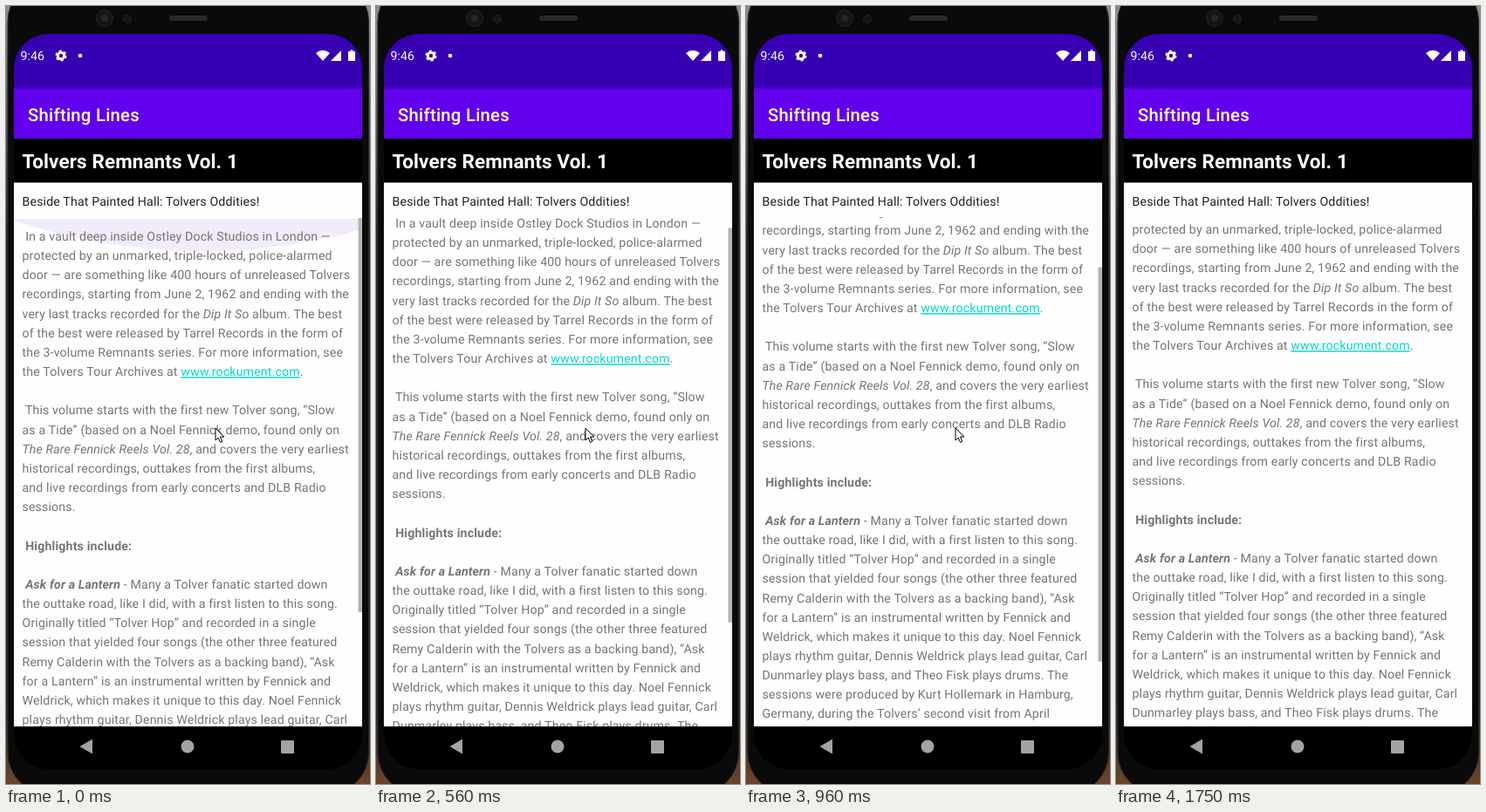
These frames come from a looping animation (417x892 px, 2150 ms). An HTML page:

```html
<!DOCTYPE html>
<html lang="en">
<head>
<meta charset="utf-8">
<title>Shifting Lines</title>
<style>
  html, body { margin: 0; width: 100%; height: 100%; overflow: hidden; background: #0a0a0b; }
  svg { display: block; }
  text { font-family: Roboto, sans-serif; white-space: pre; text-rendering: geometricPrecision; }
  .body { font-size: 14.2px; letter-spacing: .135px; }
  #article { fill: #757575; }
  .i { font-style: italic; }
  .b { font-weight: 700; }
  .link { fill: #03dac5; text-decoration: underline; }
</style>
</head>
<body>
<svg width="417" height="892" viewBox="0 0 417 892">
  <defs>
    <clipPath id="page"><rect x="9" y="242" width="399" height="584"/></clipPath>
    <clipPath id="row"><rect x="9" y="244" width="399" height="50"/></clipPath>
    <linearGradient id="desk" x2="0" y2="1">
      <stop stop-color="#8c8c8c"/>
      <stop offset=".3" stop-color="#2b2b2d"/>
      <stop offset=".9" stop-color="#2b2b2d"/>
      <stop offset="1" stop-color="#6b4428"/>
    </linearGradient>
  </defs>

  <!-- phone body -->
  <rect width="417" height="892" fill="url(#desk)"/>
  <rect x="2" y="-30" width="413.5" height="934" rx="48" fill="#0a0a0b" stroke="#29292b"/>
  <circle cx="113" cy="14" r="9.5" fill="#151517" stroke="#222225"/>
  <circle cx="113" cy="14" r="4" fill="#25262b"/>
  <circle cx="139" cy="15" r="4.5" fill="#151517" stroke="#222225"/>
  <rect x="187" y="11" width="44" height="6" rx="3" fill="#29292a"/>

  <!-- screen -->
  <path d="M9 95V72A40 40 0 0 1 49 32H368A40 40 0 0 1 408 72V95Z" fill="#3700b3"/>
  <path d="M9 94.5H408V152H9Z" fill="#6200ee"/>
  <path d="M9 152H408V835A40 40 0 0 1 368 875H49A40 40 0 0 1 9 835Z" fill="#000"/>
  <path d="M9 202.5H408V826H9Z" fill="#fefefe"/>

  <!-- status bar -->
  <g fill="#fff">
    <text x="16.5" y="62" font-size="14.2">9:46</text>
    <circle cx="63" cy="57" r="3.7" fill="none" stroke="#fff" stroke-width="3"/>
    <circle cx="63" cy="57" r="5.5" fill="none" stroke="#fff" stroke-width="2" stroke-dasharray="2.88"/>
    <circle cx="85" cy="57" r="2.3"/>
    <path d="M355 54Q363 47.5 371 54L363 63Z"/>
    <path d="M384 51V63H372Z"/>
    <path d="M392 52H394.5V50.5H397.5V52H400V63H392Z"/>
  </g>

  <text x="25" y="132" font-size="20.3" font-weight="500" letter-spacing=".25" fill="#fff">Shifting Lines</text>
  <text x="18.5" y="186" font-size="22.5" font-weight="700" letter-spacing=".1" fill="#fff">Tolvers Remnants Vol. 1</text>
  <text x="18.5" y="228.5" class="body" fill="#212121">Beside That Painted Hall: Tolvers Oddities!</text>

  <g clip-path="url(#row)">
    <circle id="ripple" cx="225" cy="-405" r="686" fill="#f1ebfc"/>
    <path id="fade" d="M9 244H408V277H9Z"/>
  </g>
  <g clip-path="url(#page)">
    <g id="article"></g>
    <rect id="bar" x="403.5" width="4.5" height="452" fill="#b3b3b3"/>
  </g>

  <!-- navigation bar -->
  <g fill="#a3a3a3">
    <path d="M84.5 849L99 840.5V857.5Z"/>
    <circle cx="208" cy="849" r="7.5"/>
    <rect x="315" y="842" width="15" height="15" rx="1"/>
  </g>

  <path id="cursor" d="M.5 .5V14.5L3.7 11.5L6 16.8L8.3 15.8L6 10.5H10.4Z" fill="#fff" stroke="#000"/>
</svg>

<script>
const LOOP = 2150, LEADING = 22.16;
const $ = id => document.getElementById(id);

// *italic*, ^bold^, ~bold italic~, _link_
const article = ` In a vault deep inside Ostley Dock Studios in London —
protected by an unmarked, triple-locked, police-alarmed
door — are something like 400 hours of unreleased Tolvers
recordings, starting from June 2, 1962 and ending with the
very last tracks recorded for the *Dip It So* album. The best
of the best were released by Tarrel Records in the form of
the 3-volume Remnants series. For more information, see
the Tolvers Tour Archives at _www.rockument.com_.

 This volume starts with the first new Tolver song, “Slow
as a Tide” (based on a Noel Fennick demo, found only on
*The Rare Fennick Reels Vol. 28*, and covers the very earliest
historical recordings, outtakes from the first albums,
and live recordings from early concerts and DLB Radio
sessions.

 ^Highlights include:^

 ~Ask for a Lantern~ - Many a Tolver fanatic started down
the outtake road, like I did, with a first listen to this song.
Originally titled “Tolver Hop” and recorded in a single
session that yielded four songs (the other three featured
Remy Calderin with the Tolvers as a backing band), “Ask
for a Lantern” is an instrumental written by Fennick and
Weldrick, which makes it unique to this day. Noel Fennick
plays rhythm guitar, Dennis Weldrick plays lead guitar, Carl
Dunmarley plays bass, and Theo Fisk plays drums. The
sessions were produced by Kurt Hollemark in Hamburg,
Germany, during the Tolvers’ second visit from April`;

const styles = { '*': 'i', '^': 'b', '~': 'i b', '_': 'link' };
const markup = line => line.replace(/([*^~_])(.+?)\1/g,
  (_, mark, words) => `<tspan class="${styles[mark]}">${words}</tspan>`);

$('article').innerHTML = article.split('\n').map((line, i) =>
  `<text class="body" x="18.5" y="${269 + i * LEADING}">${markup(line)}</text>`).join('');

// start time, scroll, pointer x, pointer y, scrollbar opacity
const poses = [
  [0, 0, 240, 484, 1],
  [560, 15, 240, 484, 1],
  [680, 45, 240, 484, 1],
  [960, 73, 240, 484, 1],
  [1110, 30, 278, 527, 1],
  [1240, 30, 308, 575, 1],
  [1390, 30, 344, 690, 1],
  [1510, 30, 372, 810, 1],
  [1630, 30, 388, 884, .5],
  [1750, 30, 400, 950, 0]
];

function draw(now) {
  const t = now % LOOP;
  const [, scroll, x, y, opacity] = poses.findLast(pose => pose[0] <= t);
  $('article').setAttribute('transform', `translate(0 ${-scroll})`);
  $('bar').setAttribute('y', 243 + scroll * .775);
  $('bar').setAttribute('opacity', opacity);
  $('cursor').setAttribute('transform', `translate(${x - .5} ${y - .5})`);
  $('ripple').setAttribute('opacity', t < 130 ? 1 : 0);
  $('fade').setAttribute('fill', t < 130 || t >= 560 ? 'none' : t < 280 ? '#f8f4fe' : '#fcfaff');
}

const start = performance.now();
function tick() {
  draw(performance.now() - start);
  requestAnimationFrame(tick);
}
tick();
</script>
</body>
</html>
```
